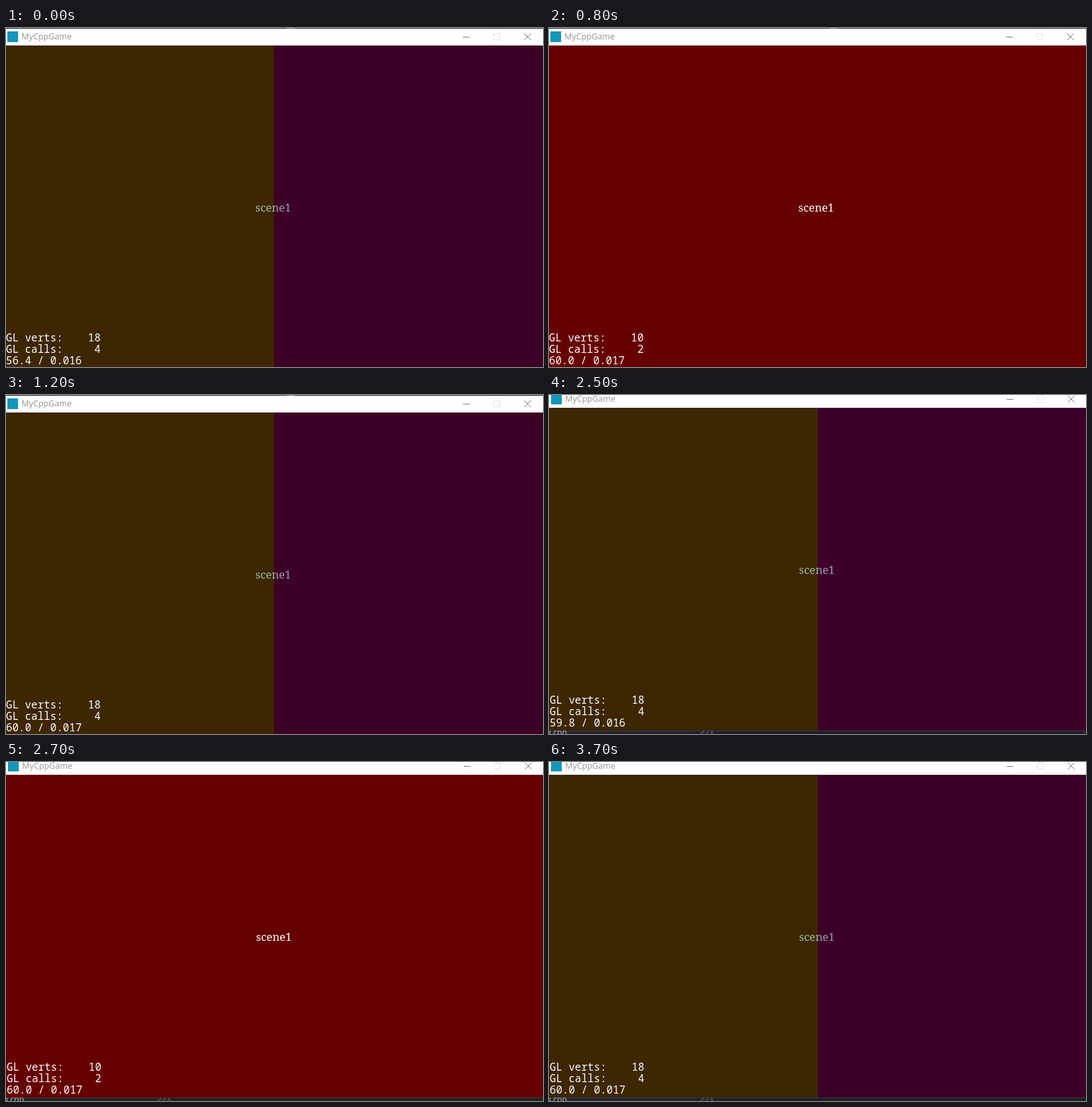
Recreate the animation shown at these times as an HTML page. Size 799x504 px, loop 4200 ms.

```html
<!DOCTYPE html>
<html lang="en">
<head>
<meta charset="utf-8">
<title>Scene transition</title>
<style>
  html, body { margin: 0; width: 100%; height: 100%; overflow: hidden; background: #fff; }
  svg { display: block; width: 799px; height: 504px; }
  text { white-space: pre; }

  .window, .blend, .solid, .fps { animation: 4200ms step-end infinite; }
  .window { animation-name: nudge; }
  .blend { animation-name: blend; }
  .solid { animation-name: solid; }
  .fps.start { animation-name: fps-start; }
  .fps.steady { animation-name: fps-steady; }
  .fps.dip { animation-name: fps-dip; }

  .title { font: 12.3px "Noto Sans", sans-serif; fill: #999; }
  .label { font: 16.5px "Noto Serif", serif; fill: #fff; }
  .stats { font: 15.67px "Noto Sans Mono", monospace; fill: #fff; }
  .behind { font: 12px "Noto Sans", sans-serif; fill: #b0b4ba; }
  .number { font: 12px "Noto Sans Mono", monospace; fill: #6a6e74; }
  .buttons { fill: none; stroke: #777; }

  @keyframes nudge {
    0% { transform: translate(-1px, 26px); }
    59.5238%, 100% { transform: translate(0, 19px); }
  }
  @keyframes blend {
    0%, 28.5714%, 88.0952%, 100% { visibility: visible; }
    4.7619%, 64.2857% { visibility: hidden; }
  }
  @keyframes solid {
    0%, 28.5714%, 88.0952%, 100% { visibility: hidden; }
    4.7619%, 64.2857% { visibility: visible; }
  }
  @keyframes fps-start {
    0% { visibility: visible; }
    4.7619%, 100% { visibility: hidden; }
  }
  @keyframes fps-steady {
    0%, 59.5238% { visibility: hidden; }
    4.7619%, 64.2857%, 100% { visibility: visible; }
  }
  @keyframes fps-dip {
    0%, 64.2857%, 100% { visibility: hidden; }
    59.5238% { visibility: visible; }
  }
</style>
</head>
<body>
<svg viewBox="0 0 799 504">
  <!-- Desktop behind the window -->
  <rect width="799" height="504" fill="#22262b"/>
  <rect x="418" width="12" height="1" fill="#666"/>
  <rect y="499" width="799" height="1" fill="#3a3e43"/>
  <rect x="216" y="500" width="583" height="4" fill="#1d2024"/>
  <text class="behind" x="0" y="506">l.cpp</text>
  <text class="number" x="224" y="503">551</text>

  <!-- Window, with its origin at the top left of the game view -->
  <g class="window">
    <rect y="-25" width="800" height="25" fill="#fff"/>
    <rect x="3" y="-21" width="16" height="16" fill="#1496bd"/>
    <text class="title" x="24" y="-9">MyCppGame</text>
    <g class="buttons">
      <path d="M681 -12.5h10"/>
      <rect x="726.5" y="-17.5" width="9" height="9" stroke="#e2e2e2"/>
      <path d="M772 -18l10 10m0 -10l-10 10"/>
    </g>

    <rect width="800" height="480" fill="#600"/>
    <text class="label" x="372" y="247">scene1</text>
    <g class="blend" fill-opacity=".4">
      <rect width="400" height="480" fill="#005f00"/>
      <rect x="400" width="400" height="480" fill="#00005f"/>
    </g>

    <g class="stats">
      <text class="blend" x="1" y="440">GL verts:    18</text>
      <text class="blend" x="1" y="457">GL calls:     4</text>
      <text class="solid" x="1" y="440">GL verts:    10</text>
      <text class="solid" x="1" y="457">GL calls:     2</text>
      <text class="fps start" x="1" y="474">56.4 / 0.016</text>
      <text class="fps steady" x="1" y="474">60.0 / 0.017</text>
      <text class="fps dip" x="1" y="474">59.8 / 0.016</text>
    </g>
  </g>
</svg>
</body>
</html>
```
